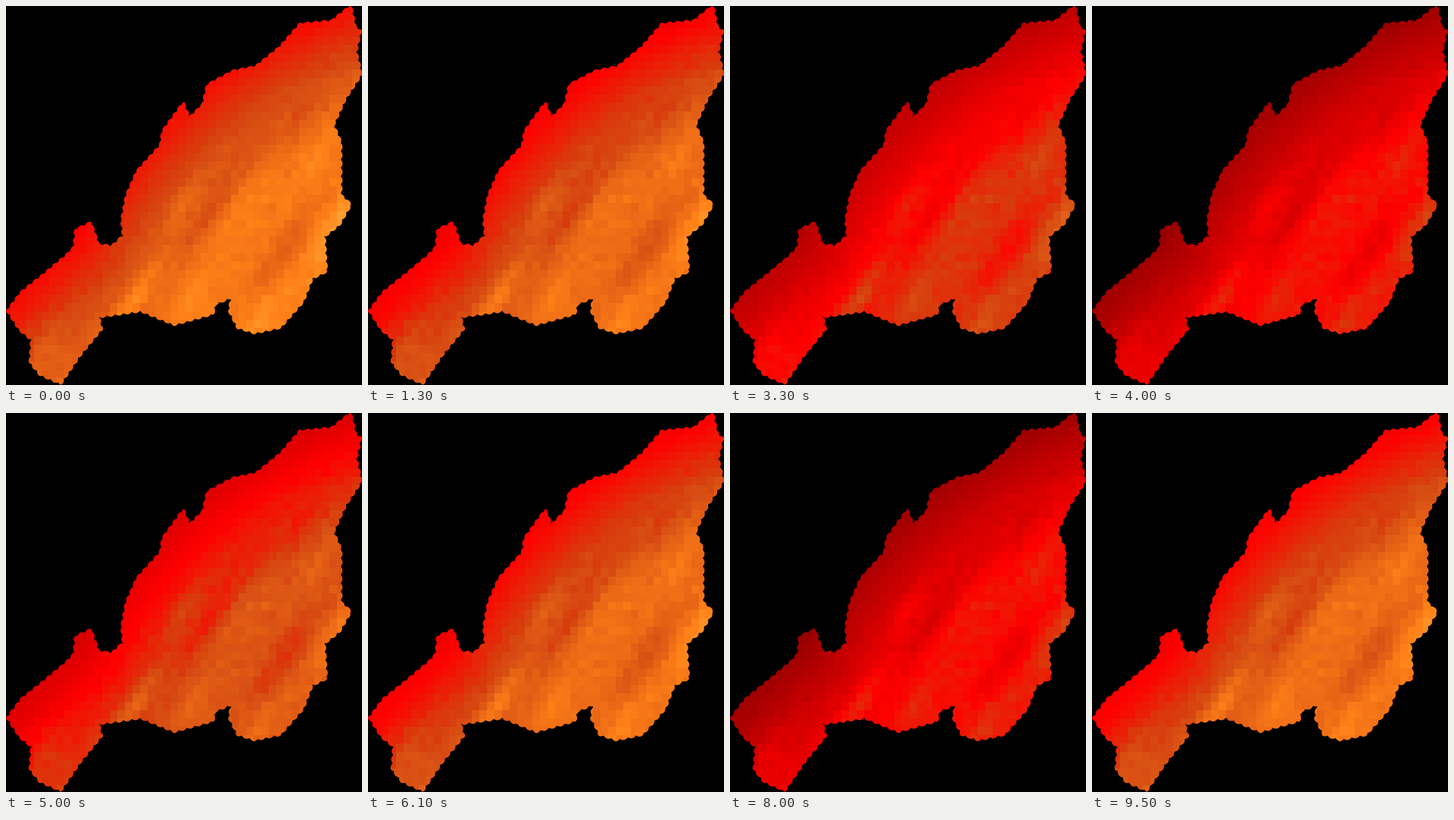
Write a matplotlib script that moves like this. It is 470x500 px and loops after 9.6 s.

```python
import numpy as np
import matplotlib.pyplot as plt
from matplotlib.animation import FuncAnimation
from matplotlib.colors import LinearSegmentedColormap
from matplotlib.path import Path
from matplotlib.patches import PathPatch

W, H, DPI = 470, 500, 100
FRAMES, INTERVAL = 96, 100
CELL_W, CELL_H = 10, 11
X0, Y0 = -3, -4
COLS, ROWS = 48, 46

# Key points of the basin outline, clockwise from the upper right tip
OUTLINE = [(455, 0), (461, 28), (468, 33), (462, 60), (469, 90), (448, 122),
           (432, 157), (442, 180), (442, 250), (455, 262), (440, 288), (420, 304),
           (423, 350), (404, 359), (392, 390), (362, 424), (328, 431), (306, 424),
           (295, 402), (298, 384), (276, 393), (273, 406), (222, 420), (178, 402),
           (122, 410), (126, 426), (98, 460), (72, 498), (45, 486), (32, 470),
           (34, 440), (18, 427), (2, 402), (20, 378), (50, 354), (80, 329),
           (90, 318), (92, 295), (112, 286), (122, 315), (140, 317), (155, 303),
           (153, 282), (159, 250), (173, 218), (204, 184), (207, 165), (234, 128),
           (242, 148), (260, 130), (266, 104), (300, 86), (330, 80), (362, 54),
           (388, 24), (430, 20)]

# Warm ridges and cool valleys: x, y, length, strength
RELIEF = [(168, 388, 50, .20), (232, 262, 40, .09), (440, 285, 65, .13),
          (240, 392, 50, .08), (410, 200, 60, .08), (52, 450, 50, .08),
          (315, 260, 80, .06), (335, 412, 55, .07), (268, 275, 60, -.10),
          (366, 325, 75, -.14), (385, 150, 40, -.08), (330, 185, 60, -.05)]

V_MIN, V_MAX = -.2, 1
STOPS = [(-.2, (120, 0, 0)), (-.04, (168, 0, 0)), (.3, (255, 0, 0)),
         (.48, (217, 60, 13)), (.55, (216, 80, 20)), (.78, (255, 130, 24)),
         (1, (255, 180, 65))]


def make_cmap():
    nodes = [((v - V_MIN) / (V_MAX - V_MIN), tuple(c / 255 for c in rgb))
             for v, rgb in STOPS]
    return LinearSegmentedColormap.from_list("heat", nodes, N=512)


def scalloped(points, pitch=11, depth=2.4):
    """Walk along a clockwise outline and push small round bumps outward."""
    p = np.array(points + points[:1], float)
    s = np.r_[0, np.cumsum(np.hypot(*np.diff(p, axis=0).T))]
    t = np.arange(0, s[-1])
    x, y = np.interp(t, s, p[:, 0]), np.interp(t, s, p[:, 1])
    dx, dy = np.gradient(x), np.gradient(y)
    bump = depth * np.abs(np.sin(np.pi * t / pitch)) / (np.hypot(dx, dy) + 1e-6)
    return np.c_[x + bump * dy, y - bump * dx]


def heat_field(x, y):
    """Warmest-month values: cool along the northwest edge, warm in the southeast."""
    across = .669 * x + .744 * (y - 402)
    along = .744 * x - .669 * (y - 402)
    cool_edge = np.minimum(45, .0009 * (along - 360) ** 2)
    v = .46 + .32 * np.tanh((across - cool_edge) / 110)

    ca, sa = np.cos(np.radians(56)), np.sin(np.radians(56))
    for cx, cy, length, amp in RELIEF:
        a = (x - cx) * ca - (y - cy) * sa
        b = (x - cx) * sa + (y - cy) * ca
        v += amp * np.exp(-(a / length) ** 2 - (b / (.28 * length)) ** 2)

    rough = np.random.default_rng(4).normal(0, .018, x.shape)
    return v + rough * np.clip(across / 60, .25, 1)


def season_drop(month):
    return .5 * np.sin(np.pi * month / 12) ** 1.6


gx, gy = np.meshgrid(X0 + CELL_W * (np.arange(COLS) + .5),
                     Y0 + CELL_H * (np.arange(ROWS) + .5))
base = heat_field(gx, gy)

fig = plt.figure(figsize=(W / DPI, H / DPI), dpi=DPI, facecolor="black")
ax = fig.add_axes([0, 0, 1, 1])
ax.axis("off")
image = ax.imshow(base, cmap=make_cmap(), vmin=V_MIN, vmax=V_MAX,
                  interpolation="nearest", aspect="auto",
                  extent=(X0, X0 + COLS * CELL_W, Y0 + ROWS * CELL_H, Y0))
ax.set_xlim(0, W)
ax.set_ylim(H, 0)
basin = PathPatch(Path(scalloped(OUTLINE)), transform=ax.transData)
image.set_clip_path(basin)


def draw(i):
    image.set_data(base - season_drop(i % 12))
    return [image]


anim = FuncAnimation(fig, draw, frames=FRAMES, interval=INTERVAL,
                     repeat=True, repeat_delay=0)
plt.show()
```
